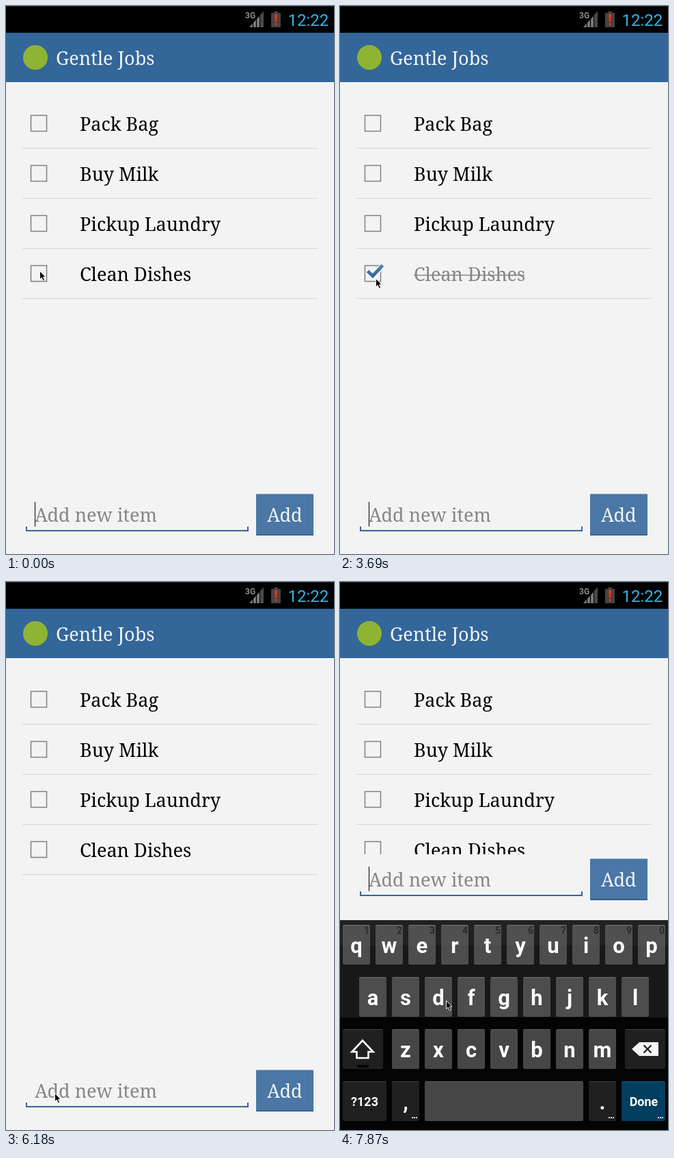
An HTML page for the animation above (7.99 s loop, 480x799 px).

```html
<!DOCTYPE html>
<html lang="en">
<head>
<meta charset="utf-8">
<title>To-do list</title>
<style>
html, body { margin: 0; width: 100%; height: 100%; overflow: hidden; background: #f3f3f3; }
svg { display: block; width: 100vw; height: 100vh; }
.serif { font: 27px "Noto Serif", serif; }
.sans { font-family: Roboto, sans-serif; }
.bold { font-family: Roboto, sans-serif; font-weight: 700; text-anchor: middle; fill: #fff; }
.letter { font-size: 31px; }
.label { font-size: 18px; }
.hint { font-size: 14px; fill: #2b2b2b; }

.anim { animation: 7990ms step-end infinite; }
#caret { animation-name: blink, hop; animation-duration: 7990ms; animation-timing-function: step-end; animation-iteration-count: infinite; }
#mouse { animation-name: mouse; }
#done { animation-name: done; }
#todo { animation-name: todo; }
#low { animation-name: low; }
#high { animation-name: high; }
#board { animation-name: board; }
#band { animation-name: band; }

@keyframes blink {
  0%, 8.635%, 20.901%, 32.665%, 46.182%, 58.823%, 70.337%, 83.103%, 96.996% { opacity: 1; }
  3.254%, 14.142%, 27.284%, 39.299%, 51.564%, 65.206%, 77.346%, 90.237% { opacity: 0; }
  100% { opacity: 1; }
}
@keyframes hop {
  0% { transform: none; }
  83.103%, 100% { transform: translateY(-308px); }
}
@keyframes done {
  0%, 50.062%, 100% { opacity: 0; }
  19.399% { opacity: 1; }
}
@keyframes todo {
  0%, 50.062%, 100% { opacity: 1; }
  19.399% { opacity: 0; }
}
@keyframes low {
  0% { opacity: 1; }
  83.103%, 100% { opacity: 0; }
}
@keyframes high {
  0% { opacity: 0; }
  81.226% { opacity: .65; }
  83.103%, 100% { opacity: 1; }
}
@keyframes board {
  0% { opacity: 0; transform: translateY(9px); }
  81.226% { opacity: .85; transform: translateY(9px); }
  83.103%, 100% { opacity: 1; transform: none; }
}
@keyframes band {
  0% { transform: translateY(-6px); }
  83.103%, 100% { transform: none; }
}
@keyframes mouse {
  0% { transform: translate(49px, 386px); }
  1.752% { transform: translate(50px, 388px); }
  3.254% { transform: translate(50px, 391px); }
  16.02% { transform: translate(51px, 400px); }
  17.521% { transform: translate(52px, 404px); }
  24.28% { transform: translate(55px, 402px); }
  25.782% { transform: translate(54px, 399px); }
  27.284% { transform: translate(52px, 397px); }
  60.325% { transform: translate(75px, 517px); }
  62.202% { transform: translate(82px, 575px); }
  63.704% { transform: translate(83px, 640px); }
  65.206% { transform: translate(81px, 697px); }
  67.083% { transform: translate(78px, 720px); }
  68.71% { transform: translate(74px, 736px); }
  70.337% { transform: translate(71px, 745px); }
  90.237% { transform: translate(95px, 741px); }
  91.739% { transform: translate(74px, 736px); }
  93.617% { transform: translate(86px, 733px); }
  95.118% { transform: translate(96px, 731px); }
  96.996% { transform: translate(126px, 670px); }
  98.498%, 100% { transform: translate(155px, 610px); }
}
</style>
</head>
<body>
<svg viewBox="0 0 480 799" xmlns="http://www.w3.org/2000/svg">
  <defs>
    <linearGradient id="tick" x1="0" y1="0" x2="0" y2="1">
      <stop offset="0" stop-color="#5583b5"/><stop offset="1" stop-color="#336699"/>
    </linearGradient>
    <g id="form">
      <text class="serif" x="42" y="752" fill="#868686">Add new item</text>
      <path d="M30 759V765H354V759" fill="none" stroke="#336699" stroke-width="2"/>
      <rect x="366" y="712" width="84" height="60" rx="1" fill="#2f5a88"/>
      <rect x="366" y="711.5" width="84" height="59" rx="1" fill="#4a77a6"/>
      <text class="serif" x="382" y="752" fill="#f3f3f3">Add</text>
    </g>
  </defs>

  <rect width="480" height="799" fill="#f3f3f3"/>
  <rect width="480" height="39" fill="#000"/>
  <rect width="480" height="1" fill="#14203c"/>
  <g class="sans">
    <text x="350" y="18" font-size="12" font-weight="700" fill="#8c8c8c">3G</text>
    <path d="M377 8V31H356Z" fill="#7d7d7d"/>
    <path d="M361.5 20V31M366.5 15V31M371.5 10V31" stroke="#000" stroke-width="1.2"/>
    <path d="M372 13.5L377 8V31H372Z" fill="#4a4a4a"/>
    <path d="M392 8H398V10H402V31H388V10H392Z" fill="#444"/>
    <path d="M393 12H397L396.2 23H393.8ZM393.5 25H396.5V28H393.5Z" fill="#f0320f"/>
    <text x="412.5" y="29" font-size="24" fill="#33b5e5">12:22</text>
  </g>
  <rect y="39" width="480" height="72" fill="#336699"/>
  <circle cx="43" cy="75" r="18" fill="#8fb433"/>
  <text class="serif" x="73" y="86" fill="#f3f3f3">Gentle Jobs</text>

  <g id="list"></g>
  <g id="done" class="anim">
    <text class="serif" x="108" y="401" fill="#868686">Clean Dishes</text>
    <path d="M108 392.5H270" stroke="#868686" stroke-width="1.6"/>
    <path d="M40 387L48 394L63 378" fill="none" stroke="#fff" stroke-opacity=".7" stroke-width="8"/>
    <path d="M40.5 386.5L48 393.5L62.5 378" fill="none" stroke="url(#tick)" stroke-width="5"/>
  </g>

  <use id="low" class="anim" href="#form"/>
  <g id="high" class="anim">
    <rect y="397" width="480" height="105" fill="#f3f3f3"/>
    <use href="#form" y="-308"/>
  </g>
  <rect id="caret" x="42" y="723" width="1" height="36" fill="#000"/>

  <g id="board" class="anim">
    <rect y="493" width="480" height="306" fill="#212121"/>
    <g id="band" class="anim">
      <rect y="530" width="480" height="106" fill="#181818"/>
      <rect y="635" width="480" height="170" fill="#040404"/>
    </g>
    <g id="keys"></g>
    <path d="M33 668.5L48.5 685H41.5V694H24.5V685H17.5Z" fill="none" stroke="#fff" stroke-width="2.6"/>
    <rect x="25" y="704" width="17" height="4" rx="1" fill="#050505"/>
    <path d="M427 681L438 671H466V691H438Z" fill="#f4f4f4"/>
    <path d="M444.5 675.5L455.5 686.5M455.5 675.5L444.5 686.5" stroke="#222" stroke-width="2.4"/>
  </g>

  <g id="mouse" class="anim">
    <path d="M.5 .5V12.5L3.2 10L5.4 14.8L7.6 13.8L5.4 9.2H9Z" fill="#000" stroke="#fff" stroke-width=".9"/>
  </g>
</svg>
<script>
const get = id => document.getElementById(id);

const items = ["Pack Bag", "Buy Milk", "Pickup Laundry", "Clean Dishes"];
get("list").innerHTML = items.map((name, i) => {
  const y = 73 * i;
  const last = i === items.length - 1;
  return `<path d="M24 ${y + 207.5}H456" stroke="#d6d6d6"/>
    <rect x="36.5" y="${y + 159.5}" width="23" height="23" fill="none" stroke="#808080" stroke-width="1.5"/>
    <text class="serif${last ? " anim" : ""}" ${last ? 'id="todo"' : ""} x="108" y="${y + 182}">${name}</text>`;
}).join("");

const text = (cls, x, y, s) => `<text class="bold ${cls}" x="${x}" y="${y}">${s}</text>`;
const dots = (x, y) => [0, 3, 6].map(d => `<rect x="${x + d}" y="${y}" width="2" height="2" fill="#ddd"/>`).join("");

function key(x, y, w, fill = "#fff", alpha = .27) {
  return `<rect x="${x}" y="${y + 1}" width="${w}" height="58" rx="2" fill="#000" opacity=".5"/>
    <rect x="${x}" y="${y}" width="${w}" height="58" rx="2" fill="${fill}" fill-opacity="${alpha}"/>
    <path d="M${x + 1} ${y + .5}h${w - 2}" stroke="#fff" stroke-opacity=".15"/>`;
}

function row(chars, x0, y, hints) {
  return [...chars].map((c, i) => {
    const x = x0 + 48 * i;
    return key(x, y, 40) + text("letter", x + 20, y + 41, c) +
      (hints ? text("hint", x + 35, y + 13, (i + 1) % 10) : "");
  }).join("");
}

const dark = (x, y, w) => key(x, y, w, "#fff", .12);
get("keys").innerHTML =
  row("qwertyuiop", 4, 500, true) +
  row("asdfghjkl", 28, 576) +
  row("zxcvbnm", 76, 652) +
  dark(4, 652, 59) + dark(417, 652, 59) +
  dark(4, 728, 64) + text("label", 36, 764, "?123") +
  dark(76, 728, 40) + text("letter", 96, 769, ",") + dots(105, 780) +
  key(124, 728, 232) +
  dark(364, 728, 40) + text("letter", 384, 769, ".") + dots(393, 780) +
  key(412, 728, 64, "#003f60", 1) + text("label", 444.5, 764, "Done") + dots(465, 780);
</script>
</body>
</html>
```
